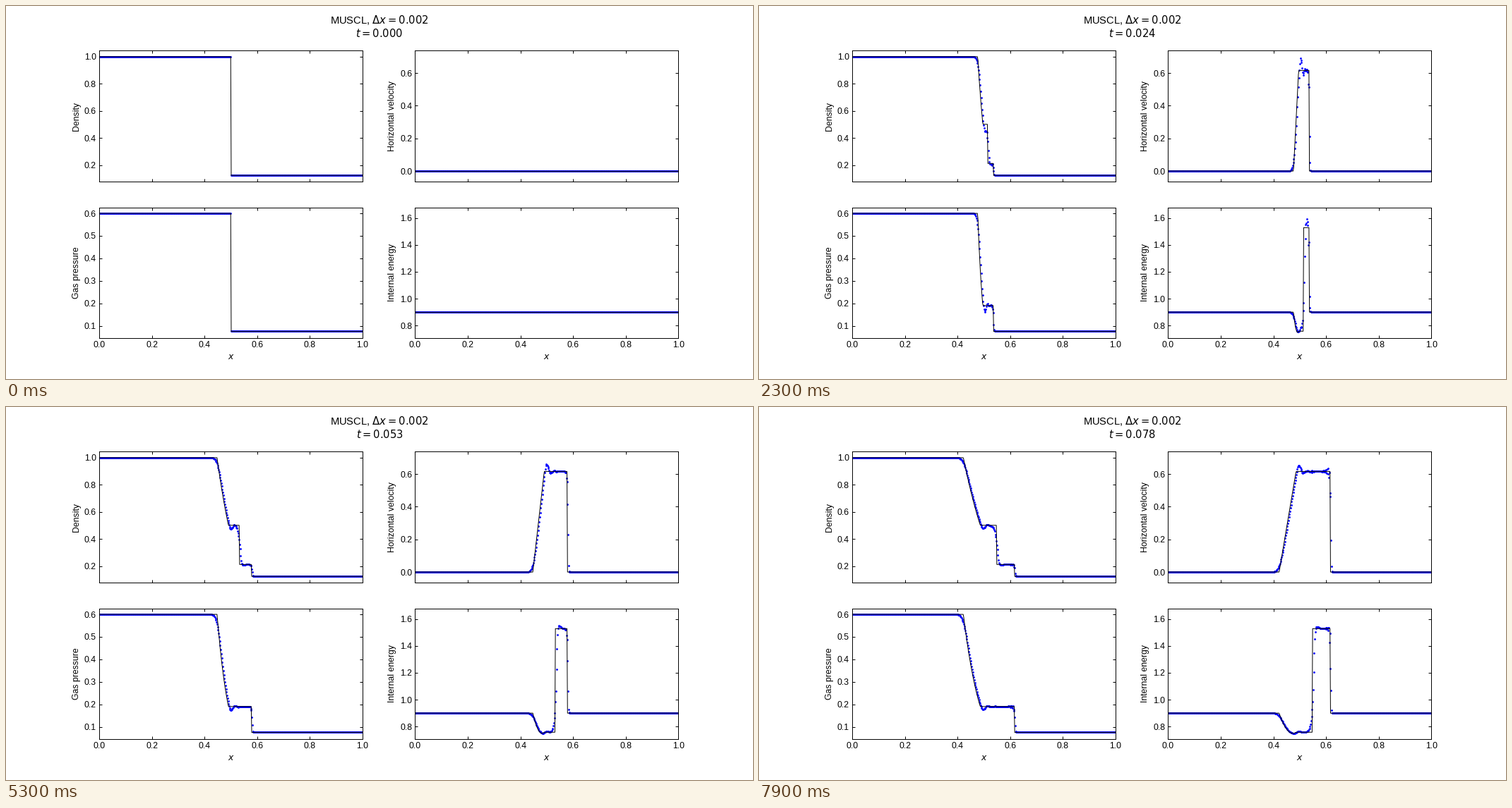
Animation of 1058x529 px, one loop 8000 ms. Source, as a matplotlib script:

```python
import numpy as np
import matplotlib
import matplotlib.pyplot as plt
from matplotlib.animation import FuncAnimation

matplotlib.rcParams.update({
    "font.family": "Liberation Sans", "font.size": 10,
    "xtick.direction": "in", "ytick.direction": "in",
    "xtick.top": True, "ytick.right": True,
})

GAMMA = 5 / 3
N = 500
DX = 1 / N
CFL = 0.9
FRAMES = 80
LEFT = (1.0, 0.0, 0.6)        # density, velocity, pressure
RIGHT = (0.125, 0.0, 0.075)
x = (np.arange(N) + 0.5) * DX


def to_cons(rho, u, p):
    return np.array([rho, rho * u, p / (GAMMA - 1) + 0.5 * rho * u * u])


def to_prim(q):
    rho = q[0]
    u = q[1] / rho
    return rho, u, (GAMMA - 1) * (q[2] - 0.5 * rho * u * u)


def sound(rho, p):
    return np.sqrt(GAMMA * p / rho)


def flux(q):
    rho, u, p = to_prim(q)
    return np.array([q[1], q[1] * u + p, (q[2] + p) * u])


def minmod(a, b):
    return np.where(a * b > 0, np.sign(a) * np.minimum(abs(a), abs(b)), 0.0)


def max_speed(q):
    rho, u, p = to_prim(q)
    return abs(u) + sound(rho, p)


def rate(q):
    """Time derivative from limited linear reconstruction."""
    g = np.pad(q, ((0, 0), (2, 2)), mode="edge")
    d = np.diff(g)
    s = minmod(d[:, :-1], d[:, 1:])[:, :-1] / 2
    a, b = g[:, 1:-2] + s, g[:, 2:-1] - s
    c = np.maximum(max_speed(a), max_speed(b))
    f = 0.5 * (flux(a) + flux(b)) - 0.5 * c * (b - a)
    return -np.diff(f) / DX


def simulate():
    q = to_cons(*[np.where(x < 0.5, l, r) for l, r in zip(LEFT, RIGHT)])
    t, states = 0.0, []
    for _ in range(FRAMES):
        states.append((t, to_prim(q)))
        dt = CFL * DX / max_speed(q).max()
        q = q + dt * rate(q + 0.5 * dt * rate(q))
        t += dt
    return states


def star_state():
    """Pressure and velocity between the waves, by bisection on velocity."""
    lo, hi = 0.0, 2.0
    for _ in range(60):
        u = (lo + hi) / 2
        p = LEFT[2] * (1 - (GAMMA - 1) / 2 * u) ** (2 * GAMMA / (GAMMA - 1))
        mach = np.sqrt(max(1, (p / RIGHT[2] * (GAMMA + 1) + GAMMA - 1) / (2 * GAMMA)))
        if 2 / (GAMMA + 1) * (mach - 1 / mach) > u:
            lo = u
        else:
            hi = u
    return u, p, mach


U_STAR, P_STAR, MACH = star_state()
RHO_SHOCK = RIGHT[0] * (GAMMA + 1) * MACH**2 / ((GAMMA - 1) * MACH**2 + 2)


def exact(t):
    xi = (x - 0.5) / max(t, 1e-9)
    u = np.clip(2 / (GAMMA + 1) * (1 + xi), 0, U_STAR)
    c = 1 - (GAMMA - 1) / 2 * u
    rho = c ** (2 / (GAMMA - 1))
    p = LEFT[2] * c ** (2 * GAMMA / (GAMMA - 1))
    rho = np.where(xi > U_STAR, RHO_SHOCK, rho)
    ahead = xi > MACH
    return [np.where(ahead, r, v) for r, v in zip(RIGHT, (rho, u, p))]


def panels(rho, u, p):
    energy = p / ((GAMMA - 1) * rho) + 0.5 * u * u
    return rho, u, p, energy


states = simulate()

fig, axes = plt.subplots(2, 2, sharex=True, figsize=(12, 6), dpi=529.001 / 6)
names = ["Density", "Horizontal velocity", "Gas pressure", "Internal energy"]
limits = [(0.0813, 1.0438), (-0.063, 0.737), (0.0458, 0.6264), (0.708, 1.678)]
dots, lines = [], []
for ax, name, lim in zip(axes.flat, names, limits):
    dots += ax.plot([], [], "b.", ms=2.5, zorder=2)
    lines += ax.plot([], [], "k-", lw=0.8, zorder=3)
    ax.set(xlim=(0, 1), ylim=lim, ylabel=name)
for ax in axes[1]:
    ax.set_xlabel("$x$")
title = fig.suptitle("")


def draw(i):
    t, prim = states[i]
    for dot, y in zip(dots, panels(*prim)):
        dot.set_data(x, y)
    for line, y in zip(lines, panels(*exact(t))):
        line.set_data(x, y)
    title.set_text(f"MUSCL, $\\Delta x = 0.002$\n$t = {t:.3f}$")
    return [*dots, *lines, title]


anim = FuncAnimation(fig, draw, frames=FRAMES, interval=100, repeat=True,
                     repeat_delay=0, init_func=lambda: draw(0))
plt.show()
```
